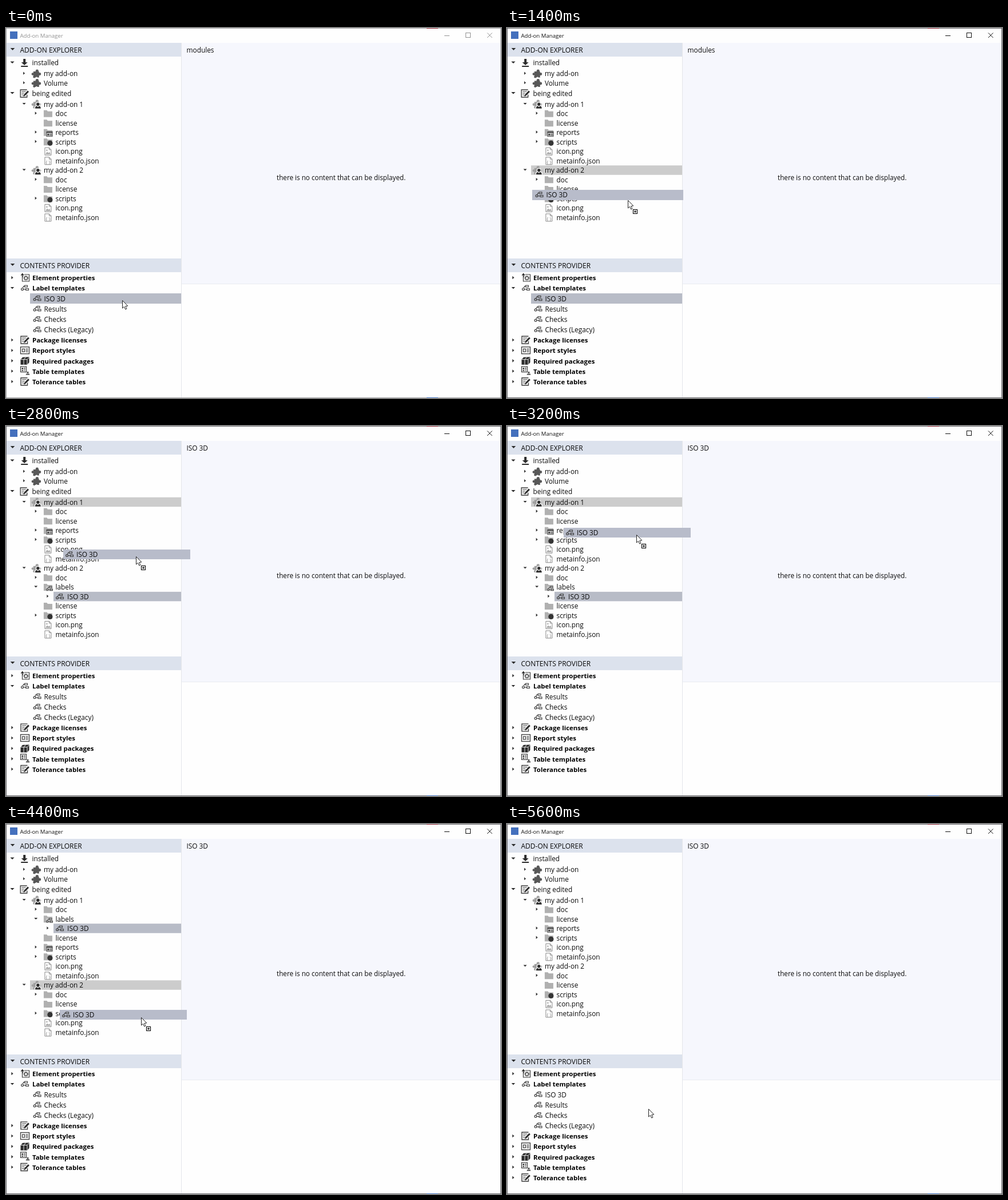
An HTML page with a canvas for the animation above (6.2 s loop, 865 by 647 pixels).

```html
<!DOCTYPE html>
<html lang="en">
<head>
<meta charset="utf-8">
<title>Add-on Manager</title>
<style>
  html, body { margin: 0; width: 100%; height: 100%; overflow: hidden; background: #fff; }
  canvas { display: block; }
</style>
</head>
<body>
<canvas id="stage" width="865" height="647"></canvas>
<script>
const ctx = document.getElementById('stage').getContext('2d', { alpha: false });
const LOOP = 6200, STEP = 200;
const INK = '#0c0c0c', DARK = '#3c3c3c', GREY = '#b0b0b0', SELECTED = '#b8bcc7';
const FAMILY = '"Open Sans", "Noto Sans", sans-serif';

// pointer path: time, x, y
const PATH = [
  [0, 203, 476], [400, 209, 482], [600, 209, 482], [1000, 218, 360], [1200, 216, 322],
  [1400, 211, 301], [2400, 211, 301], [2800, 227, 228], [3200, 226, 190], [3800, 226, 190],
  [4000, 226, 187], [4200, 231, 262], [4800, 247, 489], [5000, 247, 498], [LOOP, 247, 498]
];
// where the label lives: 0 = provider, 1 and 2 = add-ons
const DRAGS = [
  { start: 800, drop: 1600, press: [209, 482], from: 0, to: 2 },
  { start: 2600, drop: 3400, press: [211, 301], from: 2, to: 1 },
  { start: 4000, drop: 5200, press: [226, 187], from: 1, to: 0 }
];

function rect(x, y, w, h, color) {
  ctx.fillStyle = color;
  ctx.fillRect(x, y, w, h);
}
function frame(x, y, w, h, color = DARK, width = 1) {
  ctx.strokeStyle = color;
  ctx.lineWidth = width;
  ctx.strokeRect(x, y, w, h);
}
function trace(points, close) {
  ctx.beginPath();
  points.forEach(([x, y], i) => i ? ctx.lineTo(x, y) : ctx.moveTo(x, y));
  if (close) ctx.closePath();
}
function poly(points, color) {
  trace(points, true);
  ctx.fillStyle = color;
  ctx.fill();
}
function line(points, color = DARK, width = 1) {
  trace(points);
  ctx.strokeStyle = color;
  ctx.lineWidth = width;
  ctx.stroke();
}
function disc(x, y, r, color) {
  ctx.beginPath();
  ctx.arc(x, y, r, 0, 7);
  ctx.fillStyle = color;
  ctx.fill();
}
function ring(x, y, r, color = DARK, width = 1) {
  ctx.beginPath();
  ctx.arc(x, y, r, 0, 7);
  ctx.strokeStyle = color;
  ctx.lineWidth = width;
  ctx.stroke();
}
function text(str, x, y, size = 11.85, color = INK, weight = 400) {
  ctx.font = `${weight} ${size}px ${FAMILY}`;
  ctx.fillStyle = color;
  ctx.fillText(str, x, Math.round(y + 4.3));
}

function arrow(x, y, open, size = 1) {
  const s = size;
  poly(open ? [[x - 4 * s, y - 2 * s], [x + 4 * s, y - 2 * s], [x, y + 2 * s]]
            : [[x - 2 * s, y - 3.5 * s], [x + 2 * s, y], [x - 2 * s, y + 3.5 * s]], '#2c2c2c');
}
function puzzle(color) {
  rect(-5, -4, 10, 10.5, color);
  disc(1.5, -5, 2.6, color);
  disc(6, 0.5, 2.4, color);
  disc(-6, 0.5, 2.2, color);
  disc(-3.5, 5.5, 2, color);
  disc(0.5, 7, 1.4, '#fff');
}
function folder() {
  poly([[-7.5, -6], [-2, -6], [-0.5, -4], [7.5, -4], [7.5, 6], [-7.5, 6]], GREY);
}
function page() {
  trace([[-5.5, -6.5], [2, -6.5], [5.5, -3], [5.5, 6.5], [-5.5, 6.5]], true);
  ctx.fillStyle = '#fff';
  ctx.fill();
  ctx.strokeStyle = '#8a8a8a';
  ctx.lineWidth = 1;
  ctx.stroke();
  line([[2, -6.5], [2, -3], [5.5, -3]], '#8a8a8a');
}

// every icon is drawn around its own centre
const ICONS = {
  download() {
    poly([[-2, -7], [2, -7], [2, -1], [5.5, -1], [0, 4], [-5.5, -1], [-2, -1]], '#2b2b2b');
    rect(-6, 5, 12, 2, '#2b2b2b');
  },
  puzzle() { puzzle('#585858'); },
  edit() {
    line([[4.5, 2], [4.5, 6.5], [-7, 6.5], [-7, -6.5], [4.5, -6.5]], DARK, 1.4);
    for (const y of [-3.5, -0.5, 2.5]) line([[-5, y], [1 - y * 0.7, y]], DARK);
    line([[-1, 3.5], [6.5, -4]], '#fff', 5);
    line([[0, 3], [6.8, -4]], '#2b2b2b', 3);
    poly([[-2, 5], [-1.3, 1.8], [1.2, 4.2]], '#2b2b2b');
  },
  user() {
    puzzle('#a0a0a0');
    disc(3, 0, 4, '#fff');
    poly([[-3, 8], [-3, 4], [0, 2], [6, 2], [9, 4], [9, 8]], '#fff');
    disc(3, 0, 2.8, '#2f2f2f');
    poly([[-2, 7.5], [-1.5, 4.5], [1, 3], [3, 5], [5, 3], [7.5, 4.5], [8, 7.5]], '#2f2f2f');
  },
  folder,
  reports() {
    folder();
    rect(-3.5, -2.5, 12, 10, '#ddd');
    frame(-2.5, -1.5, 10, 8);
    rect(-2.5, -1.5, 10, 2, DARK);
    rect(-1, 2, 3, 3, DARK);
    for (const y of [2.5, 4.5]) line([[3, y], [6.5, y]]);
  },
  scripts() {
    folder();
    disc(3.5, 2, 4.6, '#353535');
  },
  labels() {
    folder();
    ctx.translate(2.5, 2.5);
    ctx.scale(0.85, 0.85);
    rect(-7, -5, 14, 10, '#c9c9c9');
    ICONS.label();
  },
  image() {
    page();
    poly([[-4.5, 5], [-1.5, 0.5], [0.5, 3], [2.5, 1], [4.5, 5]], '#a8a8a8');
    disc(-2, -2, 1.3, '#a8a8a8');
  },
  json() {
    page();
    ctx.font = `8px ${FAMILY}`;
    ctx.fillStyle = '#777';
    ctx.textAlign = 'center';
    ctx.fillText('{ }', 0, 4.5);
  },
  label() {
    ring(-4.5, 2, 1.9, DARK, 1.2);
    line([[-3.8, 0.2], [-2.4, -3], [-0.5, -3]], DARK, 1.1);
    line([[-2.6, 2.2], [1.5, 2.2]], DARK, 1.1);
    frame(-0.5, -4.5, 5, 2.8, DARK, 1.1);
    frame(1.5, 1, 5, 2.8, DARK, 1.1);
  },
  element() {
    line([[-1, -5.5], [7.5, -5.5], [7.5, 6.5], [-4.5, 6.5], [-4.5, 0]], DARK, 1.2);
    ring(1.8, 0.8, 2.6, DARK, 1.3);
    ctx.setLineDash([1.3, 1.4]);
    ring(1.8, 0.8, 3.9, DARK, 1.2);
    ctx.setLineDash([]);
    poly([[-7.5, -4], [-4.3, -8], [-1, -4]], '#2b2b2b');
    rect(-5.2, -4, 1.8, 4, '#2b2b2b');
  },
  report() {
    frame(-7.5, -6, 15, 12, DARK, 1.3);
    frame(-4.5, -2.5, 4, 5, DARK, 1.2);
    for (const y of [-2.5, 0, 2.5]) line([[1.5, y], [5.5, y]], DARK, 1.2);
  },
  packages() {
    poly([[-7.5, -2], [-4, -6], [7.5, -6.5], [7.5, 3], [4, 7], [-7.5, 7]], '#2b2b2b');
    line([[-7, -2.2], [4, -2.2], [7.5, -6]], '#fff', 0.9);
    line([[4, -2], [4, 7]], '#fff', 0.9);
    line([[-2, -2], [-2, 7]], '#fff', 0.9);
    line([[-2, -2.2], [1.5, -6.2]], '#fff', 0.9);
  },
  table() {
    frame(-7.5, -8, 10, 9.5, DARK, 1.2);
    rect(-5.5, -6, 2.5, 3, DARK);
    rect(-5.5, -2, 2.5, 2, DARK);
    for (const y of [-5.5, -3.5, -1]) line([[-2, y], [1, y]]);
    disc(5, 2.3, 1.5, DARK);
    poly([[1.5, 6.5], [2.5, 4.5], [7.5, 4.5], [8.5, 6.5]], DARK);
  }
};
function icon(name, x, y) {
  ctx.save();
  ctx.translate(x, y);
  ICONS[name]();
  ctx.restore();
}

// level, icon, text, arrow state (undefined = no arrow)
function addonRows(n, home) {
  const rows = [[1, 'user', 'my add-on ' + n, true], [2, 'folder', 'doc', false]];
  if (home === n) rows.push([2, 'labels', 'labels', true], [3, 'label', 'ISO 3D', false]);
  rows.push([2, 'folder', 'license']);
  if (n === 1) rows.push([2, 'reports', 'reports', false]);
  rows.push([2, 'scripts', 'scripts', false], [2, 'image', 'icon.png'], [2, 'json', 'metainfo.json']);
  return rows;
}
function treeRow([level, pic, str, open], y) {
  const x = 11 + level * 20.6;
  if (open !== undefined) arrow(x, y - 0.8, open, level ? 0.75 : 0.9);
  icon(pic, x + 21.2, y);
  text(str, level ? x + 34.3 : 45.5, y);
}
function tree(home, target) {
  treeRow([0, 'download', 'installed', true], 61);
  treeRow([1, 'puzzle', 'my add-on', false], 80);
  treeRow([1, 'puzzle', 'Volume', false], 96.5);
  treeRow([0, 'edit', 'being edited', true], 114.5);
  let y = 133.2;
  for (const n of [1, 2]) {
    for (const row of addonRows(n, home)) {
      if (row[0] === 1 && target === n) rect(42, y - 8.5, 264, 16.5, '#cccccc');
      if (row[0] === 3) rect(83, y - 8.5, 223, 16.5, SELECTED);
      treeRow(row, y);
      y += 16.52;
    }
  }
}
function provider(home, selected) {
  const kids = ['Results', 'Checks', 'Checks (Legacy)'];
  if (home === 0) kids.unshift('ISO 3D');
  const rows = [['element', 'Element properties'], ['label', 'Label templates', true],
    ...kids.map(k => [null, k]),
    ['edit', 'Package licenses'], ['report', 'Report styles'], ['packages', 'Required packages'],
    ['table', 'Table templates'], ['edit', 'Tolerance tables']];
  rows.forEach(([pic, str, open], i) => {
    const y = 437 + i * 18.17;
    if (pic) {
      arrow(11, y - 0.5, !!open, 0.8);
      icon(pic, 33, y - 0.5);
      text(str, 46, y, 11.45, '#000', 700);
    } else {
      if (selected && str === 'ISO 3D') rect(42, 464, 264, 18, SELECTED);
      icon('label', 54.5, y - 0.5);
      text(str, 66.5, y);
    }
  });
}

function header(str, y) {
  rect(1, y, 305, 24, '#dce2ed');
  arrow(11.5, y + 11, true, 0.95);
  text(str, 24.5, y + 12.5, 12);
}
function windowFrame(active, heading) {
  rect(0, 0, 865, 647, '#fefefe');
  rect(307, 26, 557, 421, '#f6f7fd');
  rect(307, 447, 557, 1, '#e9ebf1');
  rect(306, 26, 1, 620, '#e4e6ea');
  frame(0.5, 0.5, 864, 646, active ? '#68686c' : '#a6a6a8');
  rect(735, 0, 20, 1, '#8d2332');
  rect(735, 646, 20, 1, '#3d6dbb');
  rect(7, 6, 13, 13, '#4470bd');
  const c = active ? '#111' : '#929292';
  text('Add-on Manager', 24.5, 12.7, 9.65, c);
  line([[766, 13.5], [775, 13.5]], c);
  frame(803.5, 8.5, 8, 8, c);
  line([[841, 8.5], [849.5, 17]], c);
  line([[849.5, 8.5], [841, 17]], c);
  header('ADD-ON EXPLORER', 26);
  header('CONTENTS PROVIDER', 403);
  text(heading, 315.5, 38.5);
  text('there is no content that can be displayed.', 473, 261.5, 11.72);
}

function pointer(x, y, badge) {
  ctx.save();
  ctx.translate(x + 0.5, y + 0.5);
  trace([[0, 0], [0, 13.5], [3, 10.8], [5.2, 15.5], [7.4, 14.5], [5.3, 10], [9.3, 9.5]], true);
  ctx.fillStyle = '#fff';
  ctx.fill();
  ctx.strokeStyle = '#222';
  ctx.lineWidth = 1;
  ctx.stroke();
  if (badge) {
    rect(8, 16, 8, 8, '#fff');
    frame(9, 16, 7, 7, '#111', 1.2);
    line([[10.5, 19.5], [14.5, 19.5]], '#111', 1.2);
    line([[12.5, 17.5], [12.5, 21.5]], '#111', 1.2);
  }
  ctx.restore();
}
function forbidden(x, y) {
  disc(x + 0.5, y + 0.5, 6, '#fff');
  ring(x + 0.5, y + 0.5, 5.6, '#b5121b', 1.9);
  line([[x - 3.5, y - 3.5], [x + 4.5, y + 4.5]], '#b5121b', 1.9);
}
function ghost(drag, x, y) {
  const small = drag.from > 0;
  const dx = x - drag.press[0], dy = y - drag.press[1];
  const left = (small ? 84 : 42) + dx;
  const mid = { 0: 473, 1: 183, 2: 298 }[drag.from] + dy;
  rect(left, mid - 9, small ? 222 : 264, small ? 17 : 18, '#b8bcca');
  icon('label', left + (small ? 11 : 12.5), mid - 0.5);
  text('ISO 3D', left + (small ? 23 : 24.5), mid);
}

function pointerAt(t) {
  const i = Math.max(1, PATH.findIndex(p => p[0] >= t));
  const [t0, x0, y0] = PATH[i - 1], [t1, x1, y1] = PATH[i];
  const k = (t - t0) / (t1 - t0);
  return [Math.round(x0 + (x1 - x0) * k), Math.round(y0 + (y1 - y0) * k)];
}
// zone under the pointer: an add-on number, 0 for the provider, -1 for nothing
function zoneAt(y, home) {
  const split = home === 1 ? 274 : 241, end = home ? 373 : 340;
  if (y > 427) return 0;
  if (y < 125 || y > end) return -1;
  return y < split ? 1 : 2;
}

function draw(t) {
  const home = DRAGS.reduce((place, d) => t >= d.drop ? d.to : place, 0);
  const drag = DRAGS.find(d => t >= d.start && t < d.drop);
  const [x, y] = pointerAt(t);
  const zone = drag ? zoneAt(y, home) : -1;
  const allowed = zone >= 0 && zone !== home;
  windowFrame(t >= 200, t < DRAGS[0].drop ? 'modules' : 'ISO 3D');
  tree(home, allowed ? zone : -1);
  provider(home, t < DRAGS[0].drop);
  if (drag) ghost(drag, x, y);
  if (drag && !allowed) forbidden(x, y);
  else pointer(x, y, !!drag);
}

const begin = performance.now();
function tick() {
  const t = (performance.now() - begin) % LOOP;
  draw(Math.floor(t / STEP) * STEP);
  requestAnimationFrame(tick);
}
tick();
</script>
</body>
</html>
```
